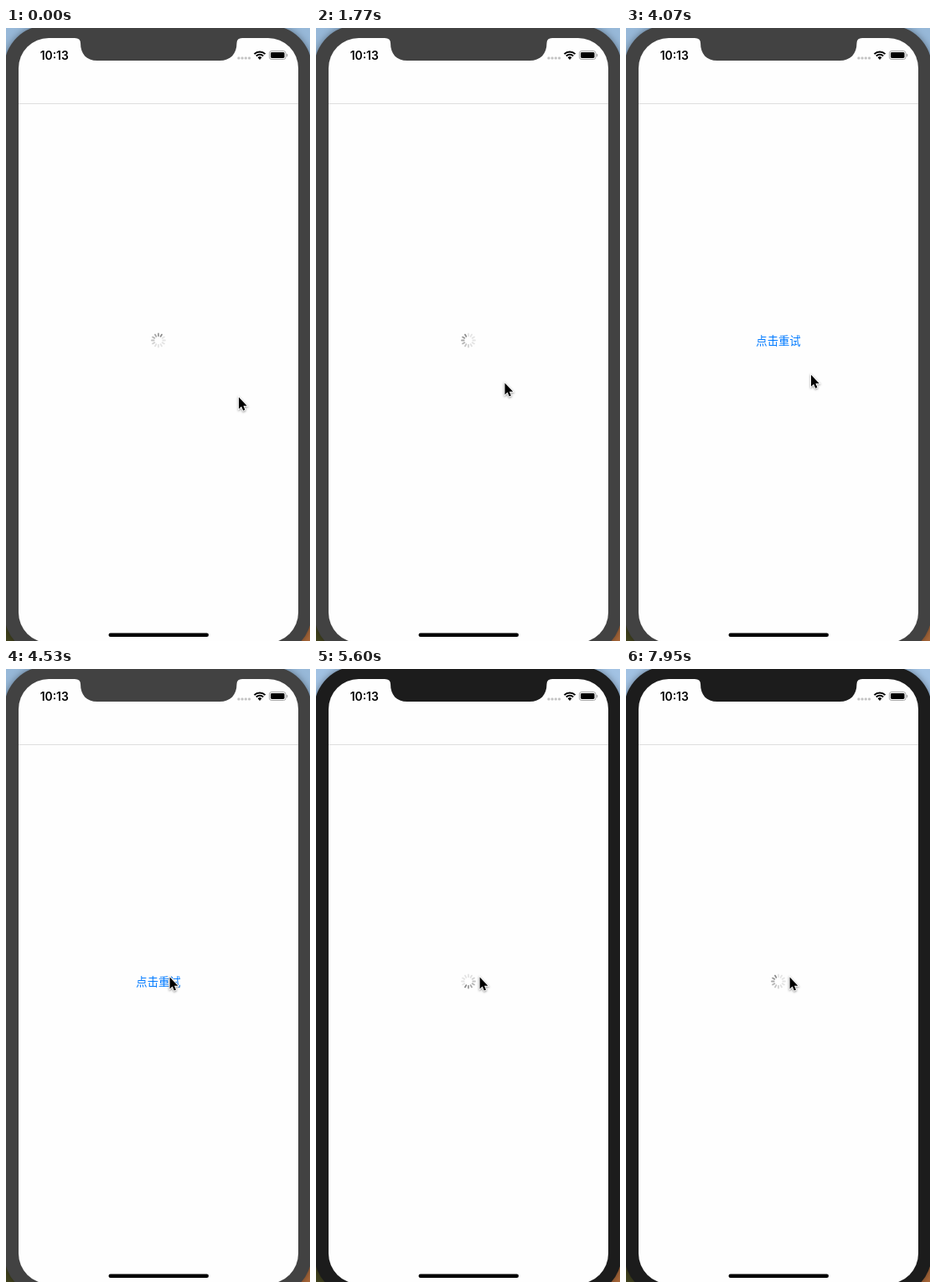
Animation, 363 px wide and 733 px high, one loop 8000 ms. Source, as an HTML page with a canvas:

```html
<!DOCTYPE html>
<html lang="zh">
<head>
<meta charset="utf-8">
<title>Loading and retry</title>
<style>
  html, body { margin: 0; width: 100%; height: 100%; overflow: hidden; background: #1c1c1c; }
  canvas { display: block; width: 363px; height: 733px; }
</style>
</head>
<body>
<canvas id="stage"></canvas>
<script>
const W = 363, H = 733, LOOP = 8000;
const FAIL = 3530, TAP = 4710, RETRY = 4770;
const canvas = document.getElementById('stage');
const ctx = canvas.getContext('2d');
const dpr = window.devicePixelRatio || 1;
canvas.width = W * dpr;
canvas.height = H * dpr;

// Pointer moves: start time, end time, target position of the tip
const START = [278, 441.5];
const MOVES = [
  [980, 1730, 225.5, 424.5],
  [1770, 1830, 224.8, 422.5],
  [4020, 4240, 197, 365],
  [4380, 4530, 195.6, 368.5]
];
const ARROW = [[0, 0], [0, 14], [3.1, 11], [5.2, 16], [7.4, 15.1], [5.4, 10.3], [9.7, 10.3]];

function box(x, y, w, h, r, color) {
  ctx.fillStyle = color;
  ctx.beginPath();
  ctx.roundRect(x, y, w, h, r);
  ctx.fill();
}

function text(str, x, y, font, color) {
  ctx.font = font;
  ctx.fillStyle = color;
  ctx.textAlign = 'center';
  ctx.textBaseline = 'alphabetic';
  ctx.fillText(str, x, y);
}

function drawDesk(active) {
  ctx.fillStyle = active ? '#a2c2e3' : '#97b8d8';
  ctx.fillRect(0, 0, W, H / 2);
  ctx.fillStyle = '#42431f';
  ctx.fillRect(0, H / 2, W / 2, H / 2);
  ctx.fillStyle = '#a9683a';
  ctx.fillRect(W / 2, H / 2, W / 2, H / 2);
}

function drawPhone(active) {
  const bezel = active ? '#1c1c1c' : '#424242';
  ctx.save();
  ctx.shadowColor = 'rgba(0,0,0,.4)';
  ctx.shadowBlur = 8 * dpr;
  box(-2, -3, 367, 753, 50, bezel);
  ctx.restore();
  box(15, 12, 334, 723, 36, '#fefefe');

  // Notch
  ctx.fillStyle = bezel;
  ctx.beginPath();
  ctx.moveTo(82, 11);
  ctx.lineTo(282, 11);
  ctx.lineTo(282, 12);
  ctx.quadraticCurveTo(275.5, 12, 275.5, 18);
  ctx.bezierCurveTo(275.5, 31, 268, 39, 255, 39);
  ctx.lineTo(109, 39);
  ctx.bezierCurveTo(96, 39, 89, 31, 89, 18);
  ctx.quadraticCurveTo(89, 12, 82, 12);
  ctx.fill();

  ctx.fillStyle = '#dedede';
  ctx.fillRect(15, 90, 334, 1);
  box(122.5, 723.5, 119.5, 4.5, 2.25, '#000');
}

function drawStatus() {
  text('10:13', 57.7, 37.5, '600 13.8px Inter, "Liberation Sans", sans-serif', '#000');
  for (let i = 0; i < 4; i++) box(276.4 + i * 4.2, 34.4, 3, 3, 1.2, '#c4c4c4');

  // Wi-Fi
  ctx.strokeStyle = '#000';
  ctx.lineWidth = 2;
  for (const r of [9.2, 5.9]) {
    ctx.beginPath();
    ctx.arc(303, 37.6, r, -Math.PI * .75, -Math.PI * .25);
    ctx.stroke();
  }
  ctx.fillStyle = '#000';
  ctx.beginPath();
  ctx.moveTo(303, 37.9);
  ctx.arc(303, 37.6, 3.4, -Math.PI * .75, -Math.PI * .25);
  ctx.fill();

  // Battery
  ctx.strokeStyle = '#a6a6a6';
  ctx.lineWidth = 1;
  ctx.beginPath();
  ctx.roundRect(314.5, 27.5, 19.5, 10, 2.6);
  ctx.stroke();
  box(316, 29, 16.5, 7, 1.4, '#000');
  box(335, 30.8, 1.3, 3.6, [0, 1.3, 1.3, 0], '#a6a6a6');
}

function spinnerHead(t) {
  return t < FAIL
    ? 1 + Math.floor((t + 20) / 80)
    : 8 + Math.floor((t - TAP) * 12 / 1000 + .45);
}

function drawSpinner(t) {
  const head = spinnerHead(t) % 12;
  ctx.save();
  ctx.translate(182, 373.5);
  for (let i = 0; i < 12; i++) {
    const age = (head - i + 12) % 12;
    const g = Math.min(228, 140 + age * 14);
    box(-.9, -8.9, 1.8, 4.5, .9, `rgb(${g},${g},${g})`);
    ctx.rotate(Math.PI / 6);
  }
  ctx.restore();
}

function drawRetry(alpha) {
  ctx.globalAlpha = alpha;
  text('点击重试', 182, 378.5, '400 13.36px "Noto Sans CJK SC", "Noto Sans CJK", sans-serif', '#007aff');
  ctx.globalAlpha = 1;
}

function pointerAt(t) {
  let [x, y] = START;
  for (const [from, to, tx, ty] of MOVES) {
    const p = Math.min(1, Math.max(0, (t - from) / (to - from)));
    const e = p * p * (3 - 2 * p);
    x += (tx - x) * e;
    y += (ty - y) * e;
  }
  return [x, y];
}

function drawPointer(t) {
  const [x, y] = pointerAt(t);
  ctx.save();
  ctx.translate(x, y);
  ctx.beginPath();
  for (const [px, py] of ARROW) ctx.lineTo(px, py);
  ctx.closePath();
  ctx.lineJoin = 'miter';
  ctx.lineWidth = 1.8;
  ctx.strokeStyle = '#fff';
  ctx.shadowColor = 'rgba(0,0,0,.45)';
  ctx.shadowBlur = 2.5 * dpr;
  ctx.shadowOffsetY = dpr;
  ctx.stroke();
  ctx.shadowColor = 'transparent';
  ctx.fillStyle = '#000';
  ctx.fill();
  ctx.restore();
}

function draw(t) {
  const active = t >= TAP;
  ctx.setTransform(dpr, 0, 0, dpr, 0, 0);
  drawDesk(active);
  drawPhone(active);
  drawStatus();
  if (t < FAIL || t >= RETRY) drawSpinner(t);
  else drawRetry(active ? .2 : 1);
  drawPointer(t);
}

const begin = performance.now();
function tick() {
  draw((performance.now() - begin) % LOOP);
  requestAnimationFrame(tick);
}
tick();
</script>
</body>
</html>
```
